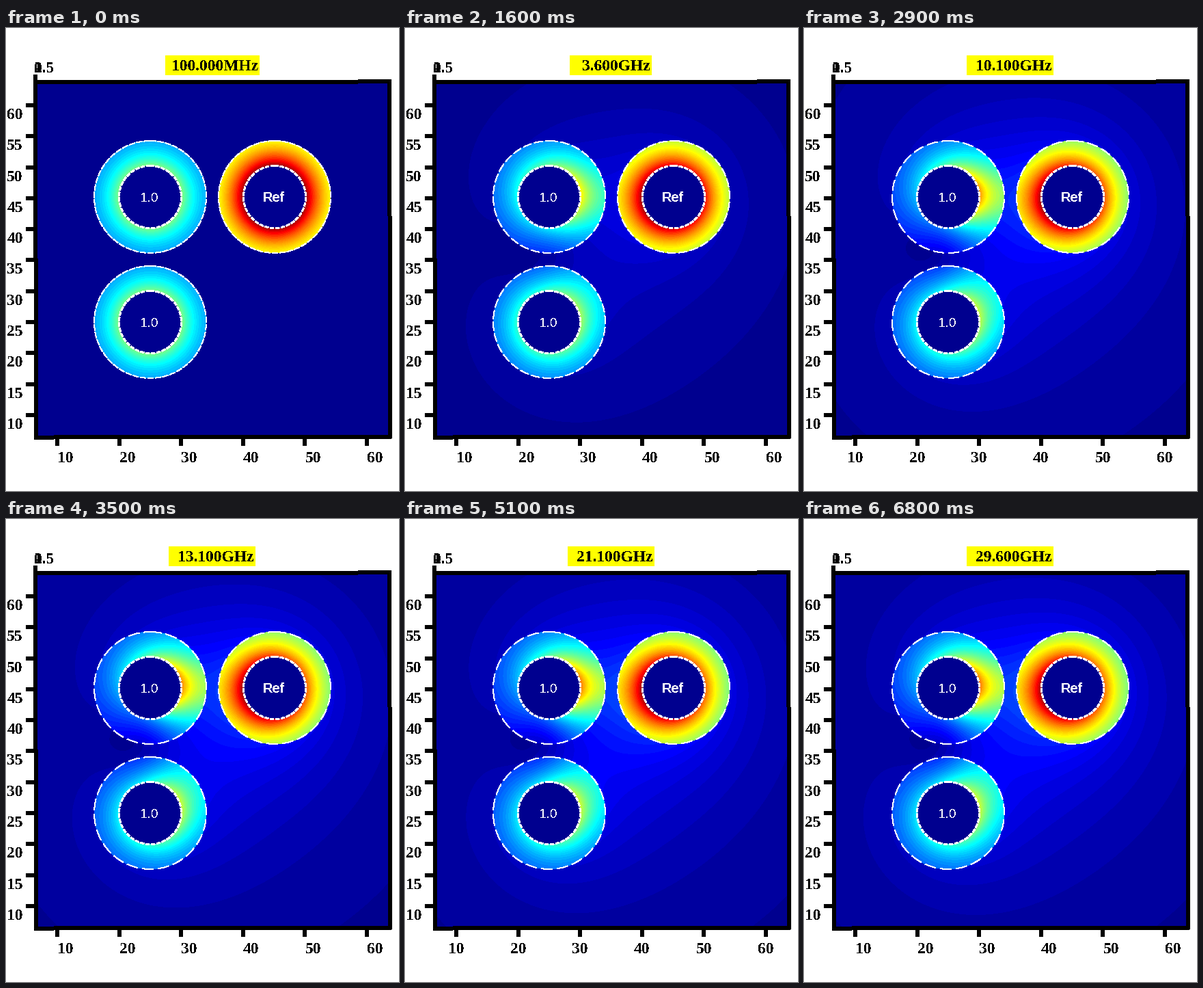
A matplotlib script for the animation above (6.9 s loop, 575 by 677 pixels).

```python
import numpy as np
import matplotlib.pyplot as plt
from matplotlib.animation import FuncAnimation
from matplotlib.patches import Circle, Rectangle

W, H, DPI = 575, 677, 64
PT = 72 / DPI                      # points per pixel
FRAMES, HOLD = 69, 9
LEFT, RIGHT, TOP, BOTTOM = 44, 562, 79, 598
R_IN, R_OUT = 45.5, 82.5
TICK = 90.6 / 10                   # pixels per axis unit

# centre x, centre y, peak level, radial falloff, polarity, response to neighbours
WIRES = [(211, 247, 0.51, 0.95, 1, 0.54),
         (211, 430, 0.51, 0.95, 1, 0.54),
         (393, 247, 1.0, 0.78, -1, 0.31)]

plt.rcParams["text.antialiased"] = False
fig = plt.figure(figsize=(W / DPI, H / DPI), dpi=DPI, facecolor="white")
ax = fig.add_axes([0, 0, 1, 1])
ax.axis("off")


def write(x, y, text, size=23.5, font="Liberation Serif", weight="bold",
          color="black", ha="center"):
    return ax.text(x, y, text, fontsize=size * PT, family=font, weight=weight,
                   color=color, ha=ha, va="baseline", zorder=5)


def bar(x0, y0, x1, y1, color="black", z=3):
    return ax.add_patch(Rectangle((x0, y0), x1 - x0, y1 - y0, fc=color,
                                  ec="none", aa=False, zorder=z))


# field of each wire, as vectors pointing away from its centre
px, py = np.meshgrid(np.arange(LEFT, RIGHT) + 0.5, np.arange(TOP, BOTTOM) + 0.5)
fields, offsets = [], []
for cx, cy, level, _, sign, _ in WIRES:
    dx, dy = px - cx, py - cy
    dist = np.maximum(np.hypot(dx, dy), 1)
    strength = sign * level * R_IN / dist ** 2
    fields.append((strength * dx, strength * dy))
    offsets.append((dx / dist, dy / dist, dist))
total = np.sum(fields, axis=0)
outside = np.hypot(*total)

rings = []
for wire, own, (ux, uy, dist) in zip(WIRES, fields, offsets):
    _, _, level, falloff, sign, response = wire
    ex, ey = response * (total[0] - own[0]), response * (total[1] - own[1])
    mirror = (R_IN / dist) ** 2
    radial = (ex * ux + ey * uy) * (1 + mirror)
    around = (ey * ux - ex * uy) * (1 - mirror)
    profile = sign * level * (R_IN / dist) ** falloff
    mask = (dist >= R_IN) & (dist <= R_OUT)
    rings.append((mask, dist < R_IN, profile, radial, around))

steps = np.arange(1, 65) / 64
JET = np.stack([np.clip(1.5 - np.abs(4 * steps - c), 0, 1) for c in (3, 2, 1)], axis=1)


def coupling(ghz):
    return ghz / np.hypot(ghz, 6.6)


def field_image(ghz):
    g = coupling(ghz)
    value = 0.232 * g * outside
    levels = []
    for mask, core, profile, radial, around in rings:
        value[core] = 0
        levels.append(np.hypot(profile + g * radial, g * around)[mask])
    peak = max(level.max() for level in levels)
    for ring, level in zip(rings, levels):
        value[ring[0]] = 0.98 * level / peak
    return JET[np.clip((value * 64).astype(int), 0, 63)]


image = ax.imshow(field_image(0.1), extent=(LEFT, RIGHT, BOTTOM, TOP),
                  interpolation="nearest", aspect="auto", zorder=1)
ax.set_xlim(0, W)
ax.set_ylim(H, 0)

# frame: a slight tilt shows as one-pixel steps
bar(40, 68, 46, 337)
bar(41, 337, 47, 600)
bar(558, 76, 564, 275)
bar(559, 275, 565, 600)
bar(40, 76, 515, 82)
bar(515, 75, 564, 81)
bar(41, 596, 70, 602)
bar(70, 595, 564, 601)

for v in range(10, 61, 5):
    y = 565.95 - (v - 10) * TICK
    bar(29, y - 3, 42, y + 3)
    write(13, y + 20, str(v))

x_labels = []
for v in range(10, 61, 10):
    x = 75 + (v - 10) * TICK
    bar(x - 3, 599, x + 3, 611)
    x_labels.append((write(x, 635, str(v)), x))

# depth axis seen end-on: its labels pile up
for v in ("0", "0.5", "1", "1.5", "2"):
    write(41, 65, v, ha="left")


def outline(cx, cy, radius, width):
    circle = Circle((cx, cy), radius, fill=False, ec="white", lw=width * PT,
                    aa=False, capstyle="butt", zorder=2)
    ax.add_patch(circle)
    return circle


def set_dash(circle, on, off, width):
    circle.set_linestyle((0, (on / width, off / width)))


RIM, CORE = 1.3, 1.7
outer_rims = []
for cx, cy, *_ in WIRES:
    outer_rims.append(outline(cx, cy, R_OUT - 0.5, RIM))
    set_dash(outline(cx, cy, R_IN, CORE), 6, 2, CORE)

for cy in (247, 430):
    write(210, cy + 7, "1.0", 19, "Liberation Sans", "normal", "white")
write(392, 254, "Ref", 20, "Liberation Sans", "bold", "white")

tag = bar(233, 40, 371, 69, "yellow", 4)
title = write(369, 62, "", ha="right")


def update(n):
    k = max(0, n - HOLD)
    ghz = 0.1 + 0.5 * k
    image.set_data(field_image(ghz))

    if ghz < 1:
        text, x0, x1 = f"{ghz * 1000:.3f}MHz", 233, 371
    else:
        x0, x1 = (241, 361) if ghz < 10 else (238, 365)
        text = f"{ghz:.3f}GHz"
    tag.set_x(x0)
    tag.set_width(x1 - x0)
    title.set_text(text)
    title.set_x(x1 - 2)

    # the axis labels hop sideways now and then
    shift = 0 if k % 9 in (2, 4, 6) else 12
    for label, x in x_labels:
        label.set_x(x + shift)

    g = coupling(ghz)
    for rim in outer_rims:
        set_dash(rim, 8 + 9 * g, 2 + 5 * g, RIM)
    return []


anim = FuncAnimation(fig, update, frames=FRAMES, interval=100, repeat=True,
                     repeat_delay=0, init_func=lambda: update(0), blit=False)
plt.show()
```
